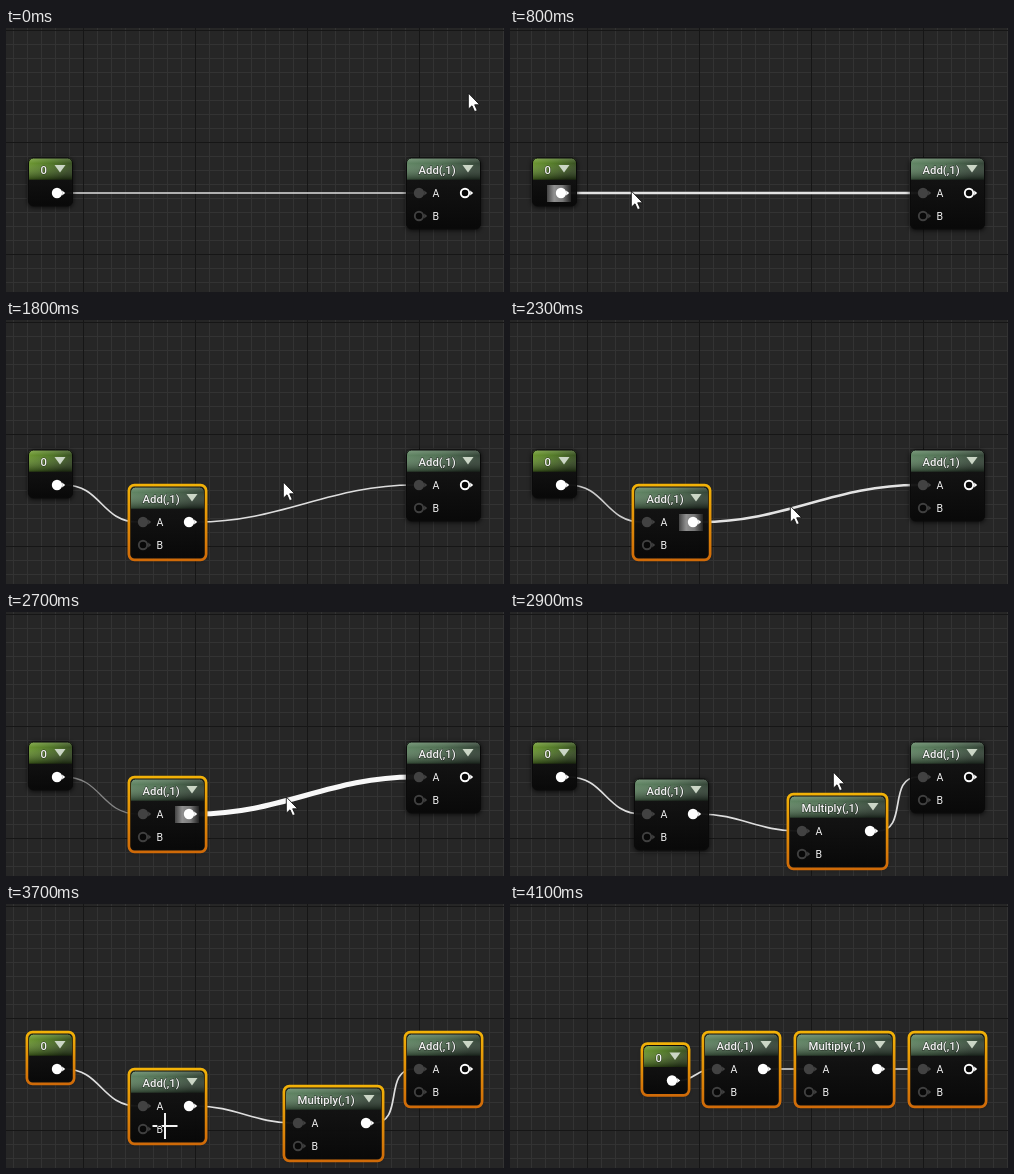
Animation of 498 by 264 pixels, one loop 4600 ms. Source, as an HTML page:

```html
<!DOCTYPE html>
<html lang="en">
<head>
<meta charset="utf-8">
<title>Node graph</title>
<style>
  html, body { margin: 0; width: 100%; height: 100%; overflow: hidden; background: #262626; }
  svg { display: block; width: 100vw; height: 100vh; }
  text { font-family: Roboto, "Open Sans", sans-serif; fill: #f2f2f2; }
  .title { font-size: 11.3px; font-weight: 500; paint-order: stroke; stroke: #0008; stroke-width: 1px; }
  .label { font-size: 10.5px; }
  .invert { mix-blend-mode: difference; }
</style>
</head>
<body>
<svg viewBox="0 0 498 264" preserveAspectRatio="none">
  <defs>
    <pattern id="minor" x="7" y="2" width="14" height="14" patternUnits="userSpaceOnUse">
      <path d="M.5 0V14M0 .5H14" stroke="#333" fill="none"/>
    </pattern>
    <pattern id="major" x="77" y="2" width="112" height="112" patternUnits="userSpaceOnUse">
      <path d="M.5 0V112M0 .5H112" stroke="#161616" fill="none"/>
    </pattern>
    <linearGradient id="const" x2="1" y2=".45">
      <stop stop-color="#6d9a2c"/><stop offset=".5" stop-color="#4c7420"/><stop offset="1" stop-color="#2c4218"/>
    </linearGradient>
    <linearGradient id="math" x2="1" y2=".25">
      <stop stop-color="#5d8460"/><stop offset=".5" stop-color="#4a6a4d"/><stop offset="1" stop-color="#2c3d2f"/>
    </linearGradient>
    <linearGradient id="gloss" x2="0" y2="1">
      <stop stop-color="#fff" stop-opacity=".2"/><stop offset=".25" stop-color="#fff" stop-opacity=".04"/>
      <stop offset="1" stop-color="#000" stop-opacity=".42"/>
    </linearGradient>
    <linearGradient id="body" x2="0" y2="1">
      <stop stop-color="#181818"/><stop offset="1" stop-color="#080808"/>
    </linearGradient>
    <linearGradient id="select" x2="0" y2="1">
      <stop stop-color="#f2b208"/><stop offset="1" stop-color="#cf6a08"/>
    </linearGradient>
    <linearGradient id="hot">
      <stop stop-color="#444"/><stop offset=".3" stop-color="#909090"/>
      <stop offset=".65" stop-color="#777"/><stop offset="1" stop-color="#222"/>
    </linearGradient>
    <filter id="soft" x="-20%" y="-20%" width="140%" height="140%"><feGaussianBlur stdDeviation="2"/></filter>
  </defs>
  <rect width="498" height="264" fill="#262626"/>
  <rect width="498" height="264" fill="url(#minor)"/>
  <rect width="498" height="264" fill="url(#major)"/>
  <g id="scene"></g>
</svg>
<script>
const LOOP = 4600, STEP = 100;
const ADD_AT = 1300, MUL_AT = 2800, DRAG_AT = 3200, DROP_AT = 3600, CROSS_AT = 3700, ALIGN_AT = 3800, GONE_AT = 4100;
const scene = document.getElementById('scene');
const clamp = v => Math.max(0, Math.min(1, v));
const mix = (a, b, k) => a + (b - a) * k;

// time, x, y of the pointer
const path = [
  [0, 462, 65], [600, 150, 151], [800, 121, 163], [900, 123, 168], [1400, 123, 168],
  [1700, 258, 156], [1800, 277, 162], [2000, 277, 162], [2400, 281, 190], [2700, 280, 185],
  [2800, 280, 185], [3100, 444, 88], [3200, 444, 88], [3300, 201, 201], [3400, 95, 194],
  [3500, 52, 192], [3600, 100, 205], [3700, 159, 222], [3800, 292, 183], [4000, 406, 127]
];

function pointer(t) {
  const i = path.findIndex(p => p[0] > t);
  if (i < 0) return path[path.length - 1].slice(1);
  const a = path[i - 1], b = path[i];
  const u = (t - a[0]) / (b[0] - a[0]), k = u * u * (3 - 2 * u);
  return [mix(a[1], b[1], k), mix(a[2], b[2], k)];
}

function nodesAt(t) {
  const done = t >= ALIGN_AT;
  const make = (title, x, y, w, h = 71) => ({ title, x, y, w, h });
  const list = [done ? make('0', 133.5, 141.5, 44, 48) : make('0', 22.5, 130, 44, 48)];
  if (t >= ADD_AT) list.push(done ? make('Add(,1)', 194.5, 130, 74) : make('Add(,1)', 124.5, 167, 74));
  if (t >= MUL_AT) list.push(done ? make('Multiply(,1)', 286.5, 130, 96) : make('Multiply(,1)', 279.5, 184, 96));
  list.push(make('Add(,1)', 400.5, 130, 74));
  return list;
}

function marquee(t) {
  if (t <= DRAG_AT || t >= DROP_AT) return null;
  const [x0, y0] = pointer(DRAG_AT), [x, y] = pointer(t - 16);
  return { x: Math.round(x) + .5, y: y0 + .5, w: Math.round(x0 - x), h: Math.round(y - y0) };
}

const touches = (a, b) => a.x < b.x + b.w && b.x < a.x + a.w && a.y < b.y + b.h && b.y < a.y + a.h;

function isSelected(t, node, i, box) {
  if (t >= DROP_AT) return true;
  if (box) return touches(node, box);
  if (t >= DRAG_AT) return false;
  return t >= MUL_AT ? i === 2 : t >= ADD_AT && i === 1;
}

// how far the wire under the pointer has swollen
function hover(t) {
  if (t < ADD_AT) return { wire: 0, k: clamp((t - 700) / 500) };
  if (t < MUL_AT) return { wire: 1, k: clamp((t - 2200) / 500) };
  return { wire: 0, k: 0 };
}

function wire(a, b, width, tone) {
  const x1 = a.x + a.w - 8, y1 = a.y + 35, x2 = b.x + 7.5, y2 = b.y + 35;
  const c = (Math.abs(x2 - x1) + Math.abs(y2 - y1)) / 3;
  return `<path d="M${x1} ${y1}C${x1 + c} ${y1} ${x2 - c} ${y2} ${x2} ${y2}" fill="none"
    stroke="rgb(${tone},${tone},${tone})" stroke-width="${width}"/>`;
}

function pin(x, y, color, filled) {
  const dot = filled ? `<circle cx="${x}" cy="${y}" r="5.2" fill="${color}"/>`
    : `<circle cx="${x}" cy="${y}" r="4.2" fill="#080808" stroke="${color}" stroke-width="1.9"/>`;
  return dot + `<path d="M${x + 5.2} ${y - 2.5}l3 2.5-3 2.5z" fill="${color}"/>`;
}

function nodeArt(n, linked, selected, hot) {
  const { w, h } = n, isConst = n.title === '0', cx = w - 15.5;
  const head = `M0 21.5V5Q0 0 5 0H${w - 5}Q${w} 0 ${w} 5V21.5Z`;
  let s = `<g transform="translate(${n.x} ${n.y})">
    <rect x="-1" y="0" width="${w + 2}" height="${h + 2}" rx="6" fill="#000" opacity=".6" filter="url(#soft)"/>
    <rect width="${w}" height="${h}" rx="5" fill="url(#body)" fill-opacity=".9"/>
    <path d="${head}" fill="url(#${isConst ? 'const' : 'math'})"/>
    <path d="${head}" fill="url(#gloss)"/>
    <rect width="${w}" height="${h}" rx="5" fill="none" stroke="#0a0a0a"/>
    <path d="M${w - 18} 7h11l-5.5 7.5z" fill="#cbd6c6"/>
    <text class="title" x="12" y="16">${n.title}</text>`;
  if (hot) s += `<rect x="${cx - 14}" y="27" width="24" height="17" fill="url(#hot)"/>`;
  s += pin(cx, 35, '#fff', linked);
  if (!isConst) s += pin(12.5, 35, '#424242', true) + pin(12.5, 58, '#404040', false)
    + '<text class="label" x="26" y="39">A</text><text class="label" x="26" y="62">B</text>';
  if (selected) s += `<rect x="-1.6" y="-1.8" width="${w + 3.2}" height="${h + 3.6}" rx="5.5"
    fill="none" stroke="url(#select)" stroke-width="2.7"/>`;
  return s + '</g>';
}

function cursorArt(t) {
  if (t >= GONE_AT) return '';
  const [x, y] = pointer(t).map(Math.round);
  if (t >= CROSS_AT)
    return `<path class="invert" d="M${x - 12.5} ${y}h25M${x} ${y - 13}v26" stroke="#fff" stroke-width="2"/>`;
  return `<path transform="translate(${x} ${y})" d="M.3 0V16.2L4 12.8 6.6 18.7 9.3 17.5 6.7 11.8H11.7Z"
    fill="#fff" stroke="#111" stroke-width=".9"/>`;
}

function draw(t) {
  const nodes = nodesAt(t), box = marquee(t), { wire: over, k } = hover(t);
  let s = '';
  for (let i = 0; i + 1 < nodes.length; i++) {
    const on = i === over;
    s += wire(nodes[i], nodes[i + 1], on ? 1.7 + 3.5 * k : 1.7 - .4 * k, Math.round(on ? 222 + 26 * k : 222 - 90 * k));
  }
  nodes.forEach((n, i) => {
    s += nodeArt(n, i < nodes.length - 1, isSelected(t, n, i, box), k > 0 && i === over);
  });
  if (box) s += `<rect x="${box.x}" y="${box.y}" width="${box.w}" height="${box.h}" fill="none"
    stroke="#f4f4f4" stroke-width="1.2" stroke-dasharray="5.5 2.5"/>`;
  scene.innerHTML = s + cursorArt(t);
}

const start = performance.now();
let shown = -1;
function tick() {
  const t = Math.floor(((performance.now() - start + 2) % LOOP) / STEP) * STEP;
  if (t !== shown) draw(shown = t);
  requestAnimationFrame(tick);
}
tick();
</script>
</body>
</html>
```
